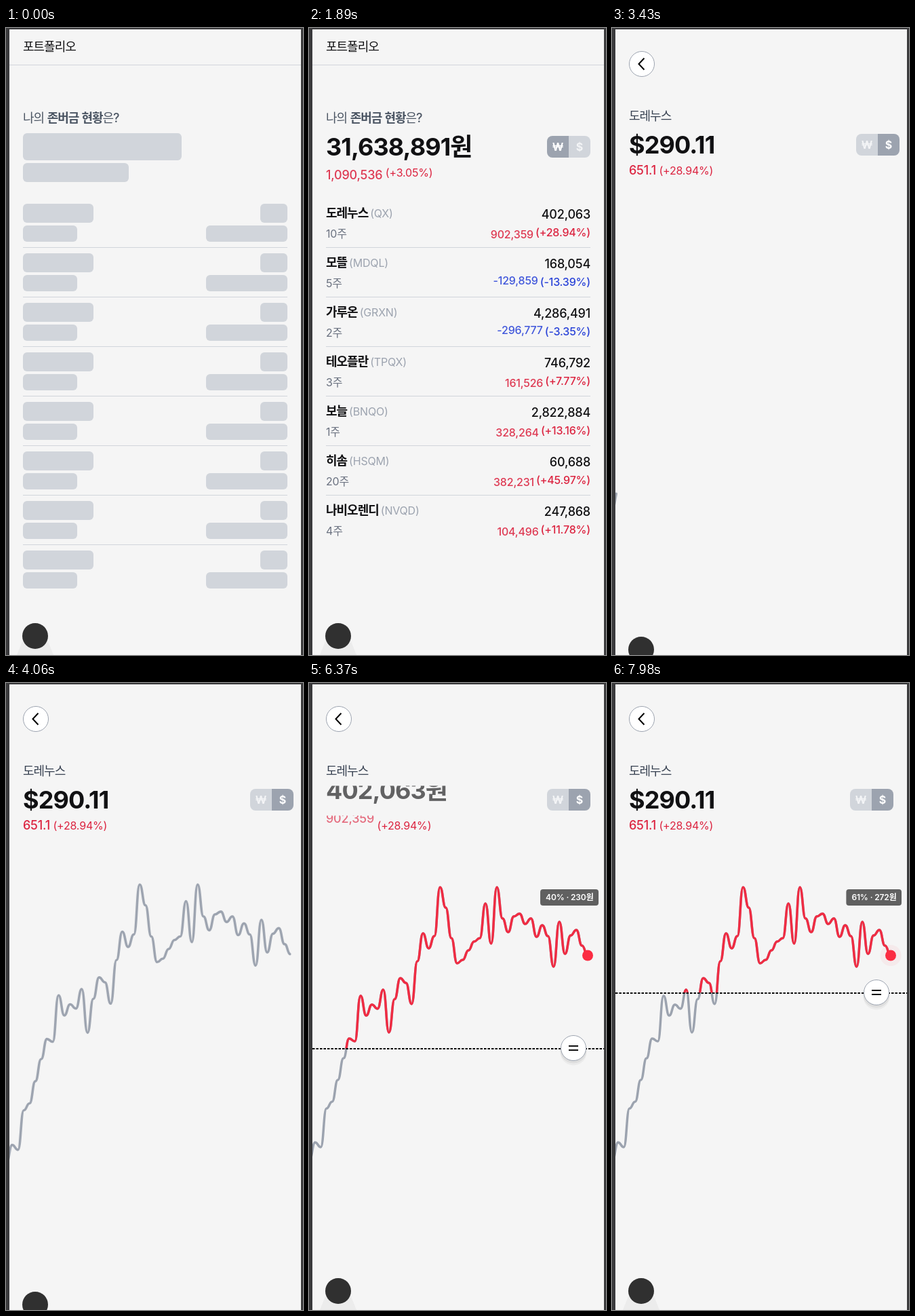
Write an HTML page that moves like this. It is 438x924 px and loops after 8000 ms.

```html
<!DOCTYPE html>
<html lang="ko">
<head>
<meta charset="utf-8">
<title>포트폴리오</title>
<style>
html, body { margin: 0; width: 100%; height: 100%; overflow: hidden; background: #3a3a3c; }
#stage { display: block; width: 438px; height: 924px; }
text { font-family: Inter, "Noto Sans CJK KR", "Noto Sans CJK", sans-serif; letter-spacing: -.012em; white-space: pre; }
.ko { letter-spacing: -.056em; }
</style>
</head>
<body>
<svg id="stage" viewBox="0 0 438 924"></svg>
<script>
const LOOP = 8000, OPEN = 3340, READY = 4340;
const INK = '#111113', RED = '#dc2440', BLUE = '#2b44d8', LINE = '#f02c43';
const GRAY = '#9ca3af', PALE = '#d1d5db', PAPER = '#f5f5f5';
const RATE = 1385.9;

// name, ticker, shares, price in won and dollars, profit in won, percent
const STOCKS = [
  ['도레누스', 'QX', 10, 402063, 290.11, 902359, 28.94],
  ['모뜰', 'MDQL', 5, 168054, 121.26, -129859, -13.39],
  ['가루온', 'GRXN', 2, 4286491, 3092.93, -296777, -3.35],
  ['테오플란', 'TPQX', 3, 746792, 538.85, 161526, 7.77],
  ['보늘', 'BNQO', 1, 2822884, 2036.86, 328264, 13.16],
  ['히솜', 'HSQM', 20, 60688, 43.79, 382231, 45.97],
  ['나비오렌디', 'NVQD', 4, 247868, 178.85, 104496, 11.78]
];
// leave time, arrive time, shows won
const LIST_SWAPS = [[1165, 1480, true], [2145, 2520, false]];
const STOCK_SWAPS = [[5275, 5590, true], [6297, 6640, false]];
const OUT = 210, IN = 300, LAG = 210;

const PRICES = [703, 677, 684, 627, 617, 585, 553, 524, 528, 461, 490, 474, 480, 452, 515, 466, 435,
  442, 473, 410, 369, 391, 373, 301, 331, 376, 413, 408, 394, 381, 376, 325, 384, 301, 347, 367, 344,
  340, 355, 347, 374, 357, 373, 418, 352, 399, 372, 364, 387, 401.5];

const stage = document.getElementById('stage');
const clamp = v => Math.max(0, Math.min(1, v));
const easeOut = v => 1 - (1 - v) ** 2;
const easeInOut = v => (1 - Math.cos(Math.PI * v)) / 2;
const num = v => v.toLocaleString('en-US', { maximumFractionDigits: 2 });
const dollars = v => num(Math.round(v * 100) / 100);
const percent = v => `(${v > 0 ? '+' : ''}${v.toFixed(2)}%)`;
const tone = v => v < 0 ? BLUE : RED;

function add(parent, tag, attrs = {}) {
  const node = document.createElementNS('http://www.w3.org/2000/svg', tag);
  set(node, attrs);
  parent.append(node);
  return node;
}
function set(node, attrs) {
  for (const key in attrs) node.setAttribute(key, attrs[key]);
}
const rect = (p, x, y, width, height, fill, rx = 0) => add(p, 'rect', { x, y, width, height, fill, rx });
const circle = (p, cx, cy, r, fill, more = {}) => add(p, 'circle', { cx, cy, r, fill, ...more });
const rule = (p, x1, x2, y, stroke, width = 1) =>
  add(p, 'line', { x1, x2, y1: y, y2: y, stroke, 'stroke-width': width });

function runs(node, str, more = {}) {
  for (const part of str.split(/([가-힣]+)/)) {
    if (!part) continue;
    const span = add(node, 'tspan', more);
    span.textContent = part;
    if (/[가-힣]/.test(part)) span.setAttribute('class', 'ko');
  }
}
function label(p, x, y, size, weight, fill, str, anchor = 'start') {
  const node = add(p, 'text', { x, y, fill, 'font-size': size, 'font-weight': weight, 'text-anchor': anchor });
  runs(node, str);
  return node;
}
function write(node, str) {
  if (node.shown === str) return;
  node.shown = str;
  node.textContent = '';
  runs(node, str);
}

function swapState(t, swaps, lag) {
  let won = false, shift = 0, alpha = 1;
  for (const [leave, arrive, next] of swaps) {
    if (t < leave) break;
    if (t < leave + OUT) {
      const k = (t - leave) / OUT;
      shift = -k;
      alpha = 1 - k;
    } else {
      const e = easeOut(clamp((t - arrive - lag) / IN));
      won = next;
      shift = 1 - e;
      alpha = e;
    }
  }
  return { won, shift, alpha };
}

// A figure that rolls inside a clipped box of one line
function roller(p, o) {
  const box = add(p, 'svg', { x: 0, y: o.top, width: 438, height: o.height, overflow: 'hidden' });
  const node = label(box, o.x, o.base - o.top, o.size, o.weight, o.fill, '', o.anchor);
  if (o.size > 30) node.style.letterSpacing = '-.025em';
  return (t, swaps) => {
    const s = swapState(t, swaps, o.lag || 0);
    write(node, s.won ? o.won : o.usd);
    node.setAttribute('opacity', s.alpha);
    node.setAttribute('transform', `translate(0 ${s.shift * o.height * (o.down ? -1 : 1)})`);
    if (o.tail) o.tail.setAttribute('x', o.x + node.getComputedTextLength() + 4.5);
  };
}

function toggle(p, y) {
  const g = add(p, 'g');
  const half = d => add(g, 'path', { d });
  const left = half(`M383 ${y}h-24a8 8 0 0 0-8 8v16a8 8 0 0 0 8 8h24z`);
  const right = half(`M383 ${y}h24a8 8 0 0 1 8 8v16a8 8 0 0 1-8 8h-24z`);
  const won = label(g, 367, y + 21.8, 16, 700, '#fff', '₩', 'middle');
  const usd = label(g, 399, y + 21.8, 16, 700, '#fff', '$', 'middle');
  return (t, swaps, dx = 0) => {
    let on = false;
    for (const [leave, , next] of swaps) if (t >= leave) on = next;
    set(left, { fill: on ? GRAY : PALE });
    set(right, { fill: on ? PALE : GRAY });
    set(won, { opacity: on ? 1 : .75 });
    set(usd, { opacity: on ? .75 : 1 });
    set(g, { transform: `translate(${dx} 0)` });
  };
}

rect(stage, 0, 0, 438, 924, '#3a3a3c');
const screen = add(stage, 'svg', { x: 5, y: 2, width: 430, height: 922, viewBox: '5 2 430 922', overflow: 'hidden' });
rect(screen, 5, 2, 430, 922, PAPER);

// Portfolio list
const home = add(screen, 'g');
label(home, 25, 34, 18, 500, INK, '포트폴리오');
rule(home, 5, 435, 54.5, PALE);
const heading = label(home, 25, 139, 18, 500, '#4b5563', '나의 ');
runs(heading, '존버금 현황', { 'font-weight': 700 });
runs(heading, '은?');

const skeleton = add(home, 'g');
const bone = (x, y, w, h) => rect(skeleton, x, y, w, h, PALE, 6);
bone(25, 155, 234, 40);
bone(25, 199, 156, 28);
for (let i = 0; i < 8; i++) {
  const y = 259 + 73 * i;
  bone(25, y, 104, 28);
  bone(375, y, 40, 28);
  bone(25, y + 32, 80, 24);
  bone(295, y + 32, 120, 24);
  if (i < 7) rule(skeleton, 25, 415, y + 64.5, PALE);
}

const list = add(home, 'g');
const listToggle = toggle(list, 159);
const totalPct = label(list, 114, 218.8, 16, 400, RED, percent(3.05));
const rollers = [
  roller(list, { x: 25, top: 155, height: 40, base: 188, size: 36, weight: 700, fill: INK,
    won: '31,638,891원', usd: '$22,829.13' }),
  roller(list, { x: 25, top: 199, height: 28, base: 219.5, size: 18, weight: 500, fill: RED,
    won: '1,090,536', usd: dollars(1090536 / RATE), lag: LAG, tail: totalPct })
];
STOCKS.forEach(([name, code, count, won, usd, gain, pct], i) => {
  const y = 73 * i, down = gain < 0, fill = tone(gain);
  const title = label(list, 25, 279.3 + y, 18, 600, INK, name);
  const ticker = label(list, 0, 278.8 + y, 16, 400, GRAY, `(${code})`);
  ticker.setAttribute('x', 25 + title.getComputedTextLength() + 3);
  label(list, 25, 308.8 + y, 16, 400, '#6b7280', count + '주');
  const share = label(list, 415, 307 + y, 16, 500, fill, percent(pct), 'end');
  rollers.push(
    roller(list, { x: 415, anchor: 'end', top: 259 + y, height: 28, base: 280.8 + y, size: 18, weight: 500,
      fill: INK, won: num(won), usd: usd.toLocaleString('en-US', { minimumFractionDigits: 2 }), down }),
    roller(list, { x: 412 - share.getComputedTextLength(), anchor: 'end', top: 290 + y, height: 24,
      base: 307.3 + y, size: 16, weight: 500, fill, won: num(gain), usd: dollars(gain / RATE), lag: LAG, down })
  );
  if (i < 6) rule(list, 25, 415, 323.5 + y, PALE);
});

// Single stock
const detail = add(screen, 'g');
circle(detail, 44, 53, 18.5, '#fff', { stroke: GRAY });
add(detail, 'path', { d: 'M47.5 44.5L39.5 53L47.5 61.5', fill: 'none', stroke: '#000', 'stroke-width': 2 });
label(detail, 25, 136, 18, 500, '#374151', STOCKS[0][0]);
const stockToggle = toggle(detail, 156);
const stockPct = label(detail, 71, 215.8, 16, 400, RED, percent(28.94));
const stockRollers = [
  roller(detail, { x: 25, top: 151.5, height: 40, base: 185, size: 36, weight: 700, fill: INK,
    won: '402,063원', usd: '$290.11' }),
  roller(detail, { x: 25, top: 195.5, height: 28, base: 216.3, size: 18, weight: 500, fill: RED,
    won: '902,359', usd: '651.1', lag: LAG, tail: stockPct })
];

const STEP = 402 / 48;
const px = i => 9 + STEP * (i - 1);
const curve = PRICES.map((y, i) => i
  ? `C${px(i - .5)} ${PRICES[i - 1]} ${px(i - .5)} ${y} ${px(i)} ${y}`
  : `M${px(0)} ${y}`).join('');
const stroke = { d: curve, fill: 'none', 'stroke-width': 3.5, 'stroke-linecap': 'round', 'stroke-linejoin': 'round' };
const chart = add(detail, 'g');
const trace = add(chart, 'path', { ...stroke, stroke: GRAY, pathLength: 1 });

const overlay = add(detail, 'g');
const above = add(overlay, 'svg', { x: 0, y: 0, width: 438, height: 538, overflow: 'hidden' });
add(above, 'path', { ...stroke, stroke: LINE });
const halo = circle(overlay, 411, 401.5, 8, '#fb2c42');
circle(overlay, 411, 401.5, 8, '#fb2c42');
const tip = rect(overlay, 344, 304, 83, 24, '#606060', 4);
const tipText = label(overlay, 419, 320.2, 12, 600, '#fff', '', 'end');
const grip = add(overlay, 'g');
set(rule(grip, 5, 435, 539, '#000', 2), { 'stroke-dasharray': '3.5 2' });
circle(grip, 390, 544, 19.5, '#000', { opacity: .04 });
circle(grip, 390, 541, 19.5, '#000', { opacity: .06 });
circle(grip, 390, 538, 18.5, '#fff', { stroke: GRAY });
for (const y of [535, 541]) rule(grip, 383, 397, y, '#111', 2);

const badge = add(screen, 'g');
add(badge, 'path', { d: 'M24 904L16 924H70L62 904Z', fill: '#ececec' });
circle(badge, 43, 896, 19, '#303030');

// Fast-starting curve (0, 0, .2, 1) for the pulse
function pulse(x) {
  let lo = 0, hi = 1;
  for (let i = 0; i < 20; i++) {
    const u = (lo + hi) / 2;
    if (.6 * u * u * (1 - u) + u ** 3 < x) lo = u; else hi = u;
  }
  return 3 * lo * lo - 2 * lo ** 3;
}
const show = (node, on) => set(node, { visibility: on ? 'visible' : 'hidden' });

function render(t) {
  const open = t >= OPEN, wide = open && t < READY;
  set(home, { opacity: open ? 0 : 1 });
  set(detail, { opacity: open ? 1 : 0 });
  set(badge, { transform: `translate(0 ${wide ? 20 : 0})` });

  if (!open) {
    const ready = clamp((t - 230) / 180);
    show(skeleton, t < 280);
    set(list, { opacity: t < 280 ? 0 : ready });
    listToggle(t, LIST_SWAPS);
    rollers.forEach(roll => roll(t, LIST_SWAPS));
    return;
  }

  stockToggle(t, STOCK_SWAPS, wide ? 9 : 0);
  stockRollers.forEach(roll => roll(t, STOCK_SWAPS));

  const drawn = easeInOut(clamp((t - 3380) / 690));
  set(chart, { transform: wide ? 'translate(5 496) scale(1.0205) translate(-5 -496)' : '' });
  set(trace, drawn < 1 ? { 'stroke-dasharray': '1 2', 'stroke-dashoffset': 1 - drawn } : { 'stroke-dasharray': 'none' });
  show(trace, drawn > 0);

  const drag = easeInOut(clamp((t - 7390) / 590));
  const dy = -82 * drag, level = Math.round(40 + 21 * drag);
  set(overlay, { opacity: clamp((t - READY + 70) / 140) });
  show(overlay, t >= READY);
  set(above, { height: 538.5 + dy });
  set(grip, { transform: `translate(0 ${dy})` });
  write(tipText, `${level}% · ${150 + 2 * level}원`);
  const w = tipText.getComputedTextLength() + 16;
  set(tip, { x: 427 - w, width: w });

  const beat = ((t - 4345 + 1030) % 1030) / 1030;
  const k = pulse(clamp(beat / .75));
  set(halo, { r: 8 * (1 + k), opacity: 1 - k });
}

const start = performance.now();
function tick() {
  render((performance.now() - start) % LOOP);
  requestAnimationFrame(tick);
}
render(0);
requestAnimationFrame(tick);
</script>
</body>
</html>
```
